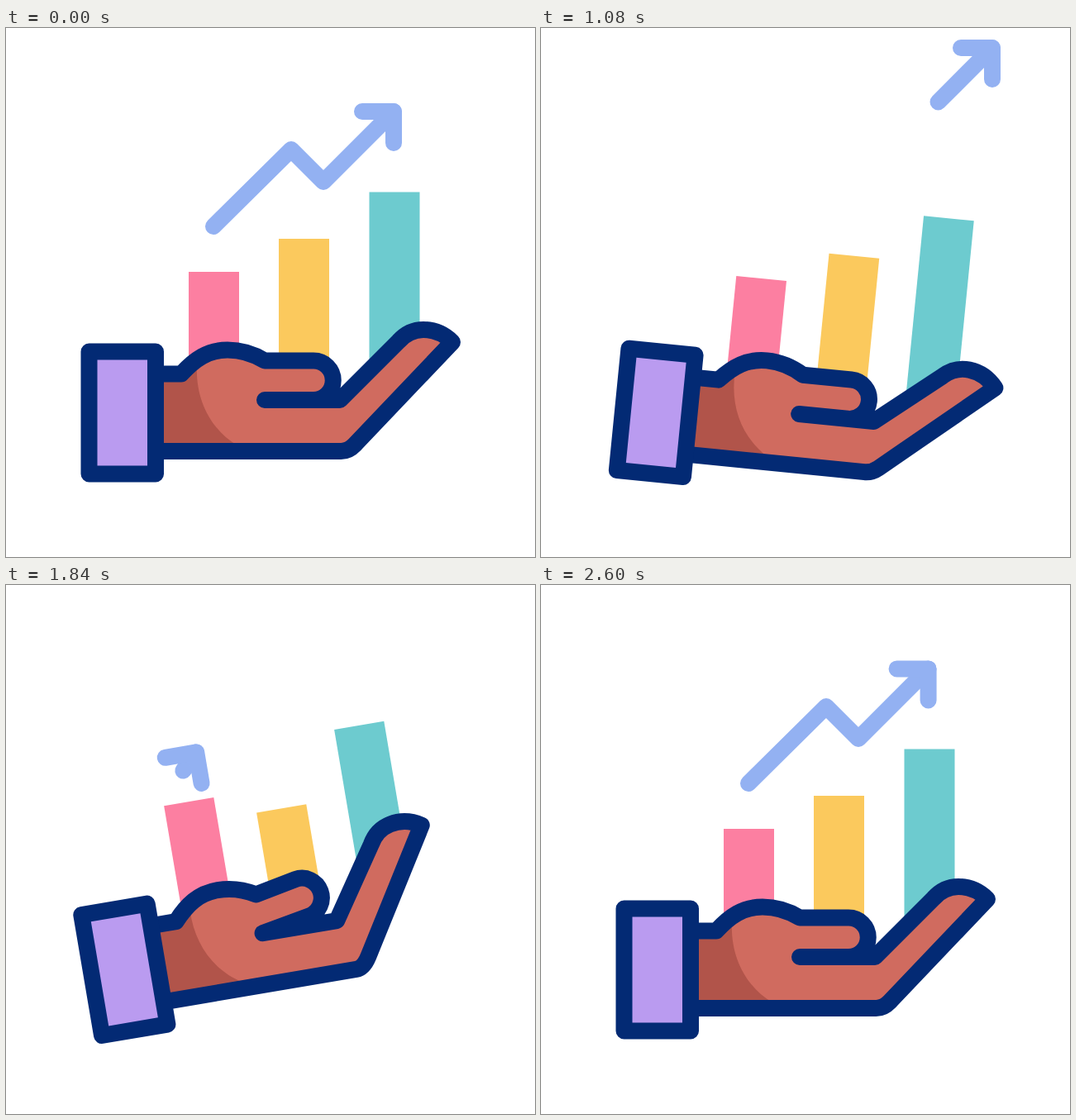
Animation of 640 by 640 pixels, one loop 3 s. Source, as an HTML page:

```html
<!DOCTYPE html>
<html lang="en">
<head>
<meta charset="utf-8">
<title>Growth in hand</title>
<style>
  html, body { margin: 0; width: 100%; height: 100%; overflow: hidden; background: #fff; }
  svg { display: block; width: 100vw; height: 100vh; }
  .line { fill: none; stroke-width: 20; stroke-linecap: round; stroke-linejoin: round; }
  .navy { stroke: #032a74; }
  .blue { stroke: #93b1f2; }
</style>
</head>
<body>
<svg viewBox="0 0 640 640">
  <g id="bars">
    <path id="pink" fill="#fc7fa1"/>
    <path id="yellow" fill="#fbc95d"/>
    <path id="teal" fill="#6dcbcf"/>
  </g>
  <g id="arrow" class="line blue">
    <path id="trend"/>
    <path id="head" d="M431 101H469V139"/>
  </g>
  <g id="hand">
    <path id="skin" fill="#d06b5f"/>
    <path fill="#b1544a" d="M181 418H212L231 408C229 450 248 486 280 505V512H181Z"/>
    <path id="outline" class="line navy"/>
    <rect class="line navy" x="100.5" y="391.5" width="80.5" height="148" style="fill:#ba9bf0"/>
  </g>
</svg>
<script>
const LOOP = 3000;
const PIVOT = [141, 450];
const KNUCKLE = [404, 442];
const THUMB = [313, 426];
const TREND = [[251, 240], [345, 147], [384, 186], [469, 101]];
const BASE = 400;
const $ = id => document.getElementById(id);
const set = (id, name, value) => $(id).setAttribute(name, value);

const part = (t, from, to) => Math.min(Math.max((t - from) / (to - from), 0), 1);
const ease = (t, from, to) => (1 - Math.cos(Math.PI * part(t, from, to))) / 2;

// Whole hand: down, up, rest. Fingers and thumb follow a little later.
const tilt = t => 9.7 * (ease(t, 880, 1243) - 2 * ease(t, 1243, 1820) + ease(t, 1820, 2200));
const raise = t => ease(t, 1450, 1860);
const relax = t => ease(t, 1860, 2410);
const bend = t => 12 * (ease(t, 880, 1270) - 2 * raise(t) + relax(t));
const lift = t => 10.3 * (raise(t) - relax(t));

// A bar sinks into the hand, shoots up past its height and settles.
function bounce(t, over) {
  const sink = 195, settle = 380;
  return 1 - ease(t, 0, sink) + over * ease(t, sink, 2 * sink)
    - (over - 1) * ease(t, 2 * sink, 2 * sink + settle);
}
const bars = [
  { id: "pink", x: 221, height: 105, over: 1.16, starts: [430, 1440], left: 420, right: 420 },
  { id: "yellow", x: 330, height: 145, over: 1.17, starts: [380, 1763], left: 420, right: 420 },
  { id: "teal", x: 439.5, height: 201.5, over: 1.09, starts: [390, 1798], left: 425, right: 392 }
];

function turn([x, y], [cx, cy], deg) {
  const a = deg * Math.PI / 180, c = Math.cos(a), s = Math.sin(a);
  return [cx + (x - cx) * c - (y - cy) * s, cy + (x - cx) * s + (y - cy) * c];
}
const xy = p => p.map(n => n.toFixed(2)).join(" ");

// The part of the trend line between two distances along it.
function trim(from, to) {
  const out = [];
  let pos = 0;
  for (let i = 0; i < 3; i++) {
    const [x0, y0] = TREND[i], [x1, y1] = TREND[i + 1];
    const len = Math.hypot(x1 - x0, y1 - y0);
    const at = d => [x0 + (x1 - x0) * d / len, y0 + (y1 - y0) * d / len];
    const a = Math.max(from - pos, 0), b = Math.min(to - pos, len);
    if (a <= b) {
      if (!out.length) out.push(at(a));
      out.push(at(b));
    }
    pos += len;
  }
  return out;
}

function handPath(angle, thumb) {
  const f = (x, y) => turn([x, y], KNUCKLE, angle);
  const th = (x, y) => {
    const p = turn([x, y], THUMB, -thumb);
    return [p[0] - 0.4 * thumb, p[1]];
  };
  const tip = f(540, 380), low = f(422, 504);
  const heel = low[0] + (512 - low[1]) * (low[0] - tip[0]) / (low[1] - tip[1]);
  return "M181 418.5H212C228 401 244 389.5 268 389.5C286 389.5 299 394 313 402.5"
    + `L${xy(th(372, 402.5))}A23.7 23.7 0 0 1 ${xy(th(372, 450))}L313 450L404 450`
    + `L${xy(f(475, 379))}C${xy(f(483, 370))} ${xy(f(494, 365))} ${xy(f(505, 365))}`
    + `C${xy(f(519, 365))} ${xy(f(531, 371))} ${xy(tip)}`
    + `L${xy(low)}Q${xy([heel, 512])} ${xy([heel - 9, 512])}H181`;
}

function drawArrow(t, spin) {
  const leaving = t < 1090;
  const line = leaving
    ? trim(215 * ease(t, 220, 740), 400)
    : trim(0, 307 * part(t, 1395, 2395) ** 3);
  const end = line[line.length - 1];
  const shift = 77 * part(t, 444, 1080) ** 2;
  set("arrow", "visibility", leaving || t >= 1680 ? "visible" : "hidden");
  set("arrow", "transform", leaving ? `translate(${shift} ${-shift})` : spin);
  set("trend", "d", "M" + line.map(xy).join("L"));
  set("head", "transform", `translate(${(end[0] - 469).toFixed(2)} ${(end[1] - 101).toFixed(2)})`);
}

function draw(t) {
  const spin = `rotate(${tilt(t).toFixed(3)} ${PIVOT.join(" ")})`;
  set("bars", "transform", spin);
  set("hand", "transform", spin);

  for (const b of bars) {
    const scale = b.starts.reduce((s, start) => s * bounce(t - start, b.over), 1);
    const top = BASE - b.height * scale;
    set(b.id, "d", `M${b.x} ${top.toFixed(2)}h61V${b.right}L${b.x} ${b.left}Z`);
  }

  const shape = handPath(bend(t), lift(t));
  set("skin", "d", shape + "Z");
  set("outline", "d", shape);
  drawArrow(t, spin);
}

const start = performance.now();
function tick() {
  draw((performance.now() - start) % LOOP);
  requestAnimationFrame(tick);
}
tick();
</script>
</body>
</html>
```
